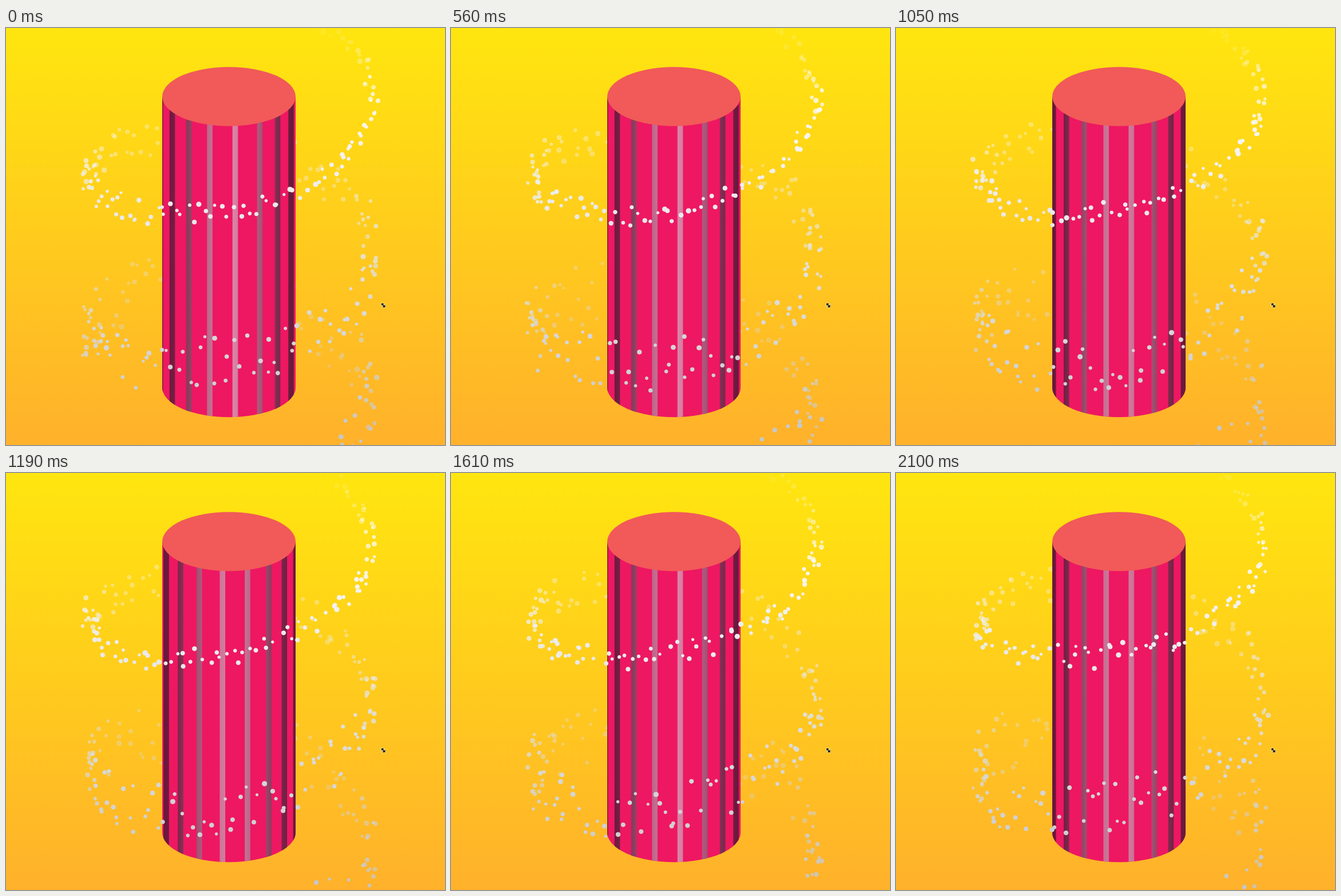
These frames come from a looping animation (767x730 px, 2.17 s). An HTML page with a canvas:

```html
<!DOCTYPE html>
<html lang="en">
<head>
<meta charset="utf-8">
<title>Spiral around a column</title>
<style>
  html, body { margin: 0; width: 100%; height: 100%; overflow: hidden; background: #ffcc1d; }
  canvas { display: block; }
</style>
</head>
<body>
<canvas id="stage" width="767" height="730"></canvas>
<script>
const W = 767, H = 730, STEP = 70, LOOP = 2170;
const ctx = document.getElementById('stage').getContext('2d');
const RAD = Math.PI / 180;

const COLUMN = { x: 389.5, rx: 116.5, ry: 51.8, top: 120, bottom: 629.5 };
const STRIPE_X = [258, 269.5, 290.5, 319.5, 356, 400.5, 443.5, 474.5, 498, 515];
const STRIPE_W = 9.6;

const HELIX = { x: 391, y: 125, r: 248, tilt: 126, pitch: 264 };
const SPEED = 15.2 / 280; // degrees per ms
const FIRST = -170, LAST = 800, DENSITY = 0.42;

const clamp = (v, lo, hi) => Math.min(hi, Math.max(lo, v));

function random(seed) {
  return () => {
    seed = (seed + 0x6d2b79f5) | 0;
    let t = Math.imul(seed ^ (seed >>> 15), 1 | seed);
    t = (t + Math.imul(t ^ (t >>> 7), 61 | t)) ^ t;
    return ((t ^ (t >>> 14)) >>> 0) / 4294967296;
  };
}

function gradient(x, y, stops) {
  const g = ctx.createLinearGradient(0, 0, x, y);
  for (const [at, color] of stops) g.addColorStop(at, color);
  return g;
}

const sky = gradient(0, H, [[0, '#ffe60f'], [1, '#ffb12b']]);
const shade = gradient(W, 0, [
  [273, '#66163b'], [291, '#701c40'], [319, '#8c3d5e'], [356, '#c06c8f'],
  [397, '#da85a6'], [443, '#a8587a'], [474, '#7d2c4f'], [498, '#6a193c']
].map(([x, color]) => [x / W, color]));

const rnd = random(41);
const dots = Array.from({ length: Math.round((LAST - FIRST) * DENSITY) }, (_, i) => ({
  angle: FIRST + (i + rnd()) / DENSITY,
  dr: (rnd() * 2 - 1) * 12,
  dy: rnd() * 2 - 1,
  size: 2.6 + rnd() * 2
}));

function place(dot, time) {
  const deg = dot.angle + time * SPEED;
  const depth = Math.sin(deg * RAD);
  const spread = 14 + 0.075 * Math.max(deg, 0);
  const fadeIn = clamp((deg + 58) / 58, 0, 1);
  return {
    x: HELIX.x + (HELIX.r + dot.dr) * Math.cos(deg * RAD),
    y: HELIX.y + HELIX.pitch * deg / 360 + HELIX.tilt * depth + dot.dy * spread,
    size: dot.size,
    front: depth >= 0,
    alpha: clamp(0.72 + 0.6 * depth, 0.33, 1) * fadeIn
  };
}

function drawDot({ x, y, size, alpha }) {
  if (alpha <= 0) return;
  const v = Math.round(clamp(262 - 0.088 * y, 190, 250));
  ctx.fillStyle = ctx.strokeStyle = `rgba(${v},${v},${v},${alpha})`;
  ctx.beginPath();
  ctx.arc(x, y, size - 0.5, 0, Math.PI * 2);
  ctx.fill();
  ctx.lineWidth = 1;
  ctx.stroke();
}

function drawColumn(shift) {
  const { x, rx, ry, top, bottom } = COLUMN;
  ctx.save();
  ctx.beginPath();
  ctx.moveTo(x - rx, top);
  ctx.lineTo(x - rx, bottom);
  ctx.ellipse(x, bottom, rx, ry, 0, Math.PI, 0, true);
  ctx.lineTo(x + rx, top);
  ctx.closePath();
  ctx.fillStyle = '#ee1762';
  ctx.fill();
  ctx.clip();
  ctx.fillStyle = shade;
  for (let i = 0; i < STRIPE_X.length - 1; i++) {
    const cx = STRIPE_X[i] + (STRIPE_X[i + 1] - STRIPE_X[i]) * shift;
    ctx.fillRect(cx - STRIPE_W / 2, top, STRIPE_W, bottom + ry - top);
  }
  ctx.restore();
  ctx.fillStyle = '#f15a58';
  ctx.beginPath();
  ctx.ellipse(x, top, rx, ry, 0, 0, Math.PI * 2);
  ctx.fill();
}

function drawPointer() {
  ctx.beginPath();
  ctx.moveTo(656, 482);
  ctx.lineTo(660, 482);
  ctx.lineTo(659, 484);
  ctx.lineTo(661, 486);
  ctx.lineTo(662.5, 484);
  ctx.lineTo(662.5, 489);
  ctx.lineTo(657.5, 489);
  ctx.lineTo(659.5, 487);
  ctx.lineTo(657.5, 485);
  ctx.lineTo(656, 486);
  ctx.closePath();
  ctx.lineWidth = 1.2;
  ctx.strokeStyle = 'rgba(255,255,255,0.75)';
  ctx.stroke();
  ctx.fillStyle = '#111';
  ctx.fill();
}

function draw(now) {
  const frame = Math.floor((now % LOOP) / STEP);
  // the stripes run through 32 quarter steps per loop, skipping one half-way
  const turn = frame + (frame > 15 ? 1 : 0);
  const placed = dots.map(dot => place(dot, frame * STEP));

  ctx.fillStyle = sky;
  ctx.fillRect(0, 0, W, H);
  placed.filter(p => !p.front).forEach(drawDot);
  drawColumn(((4 - turn % 4) % 4) / 4);
  placed.filter(p => p.front).forEach(drawDot);
  drawPointer();
}

function tick() {
  draw(performance.now());
  requestAnimationFrame(tick);
}
tick();
</script>
</body>
</html>
```
